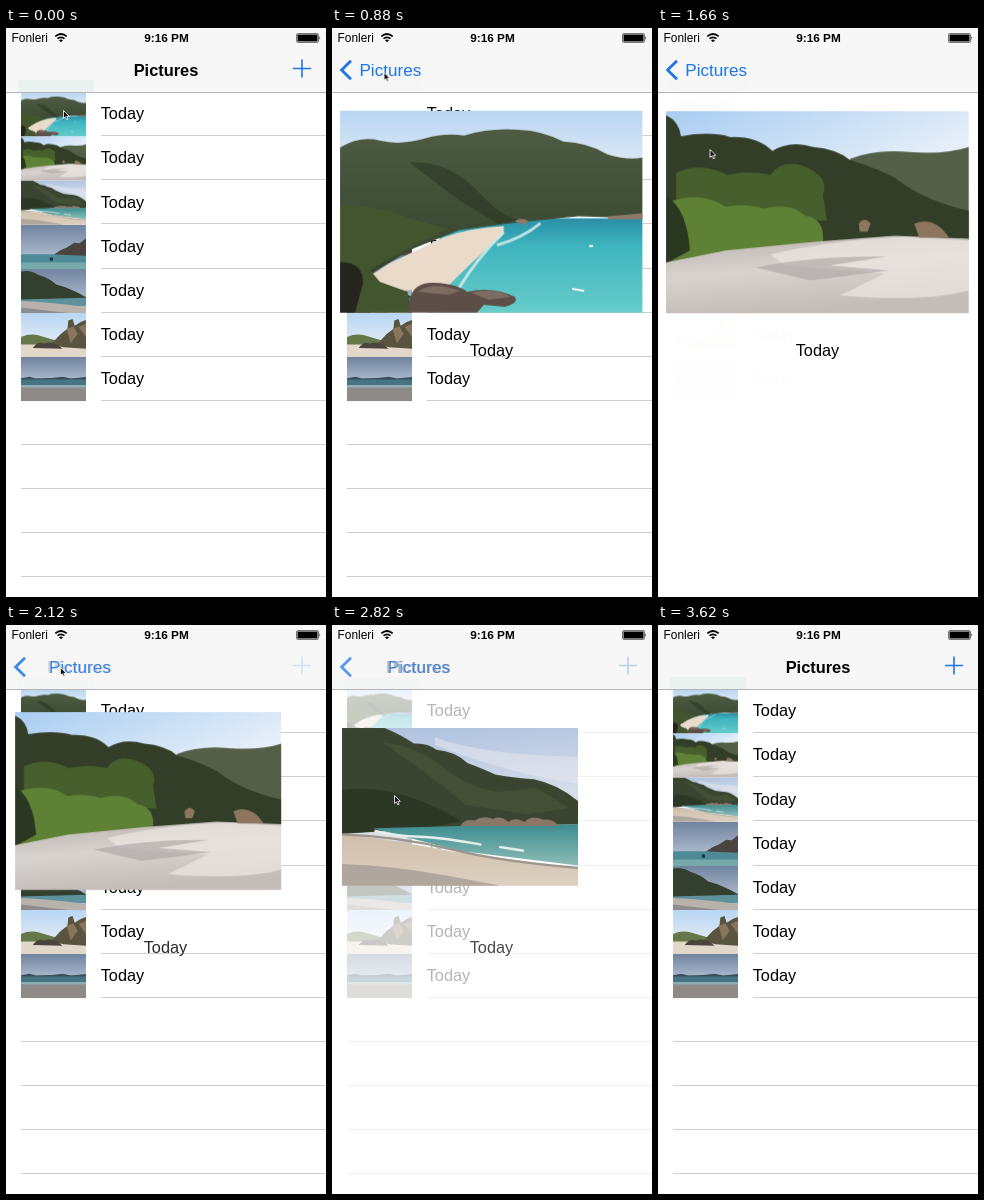
Animation of 320 by 569 pixels, one loop 3900 ms. Source, as an HTML page:

```html
<!DOCTYPE html>
<html lang="en">
<head>
<meta charset="utf-8">
<title>Picture list</title>
<style>
  html, body { margin: 0; width: 100%; height: 100%; overflow: hidden; background: #fff; }
  body { position: relative; font-family: "Liberation Sans", Arial, sans-serif; }
  svg { position: absolute; display: block; }
  .layer { left: 0; top: 0; width: 320px; height: 569px; }
  .list { z-index: 0; }
  .veil { z-index: 2; }
  .label { z-index: 4; }
  .nav { z-index: 5; }
  .cursor { z-index: 6; left: 0; top: 0; width: 9px; height: 13px; overflow: visible; }

  /* Photos rest as row thumbnails and grow to this box. */
  .photo {
    --rest: translate(7px, calc(44.1px * var(--row) - 18.5px)) scale(.2131, .2167);
    left: 7.5px; top: 82.5px; width: 305px; height: 203.5px;
    z-index: 1; transform-origin: 0 0; transform: var(--rest);
  }

  .p1, .p2, .p3, .veil, .label, .title, .back, .chevron, .action, .cursor {
    animation: 3900ms ease-in-out infinite;
  }
  .p1 { animation-name: open1; }
  .p2 { animation-name: open2; }
  .p3 { animation-name: open3; }
  .veil { animation-name: veil; }
  .label, .chevron { animation-name: show; }
  .action { animation-name: hide; }
  .title { animation-name: title; }
  .back { animation-name: back; }
  .cursor { animation-name: cursor; }

  @keyframes open1 {
    0%, .25% { transform: var(--rest); z-index: 1; }
    .26% { transform: var(--rest); z-index: 3; }
    7.44%, 22.05% { transform: none; z-index: 3; }
    29.49% { transform: var(--rest); z-index: 3; }
    29.5%, 100% { transform: var(--rest); z-index: 1; }
  }
  @keyframes open2 {
    0%, 35.89% { transform: var(--rest); z-index: 1; }
    35.9% { transform: var(--rest); z-index: 3; }
    43.08%, 52.31% { transform: none; z-index: 3; }
    59.74% { transform: var(--rest); z-index: 3; }
    59.75%, 100% { transform: var(--rest); z-index: 1; }
  }
  @keyframes open3 {
    0%, 67.81% { transform: var(--rest); z-index: 1; }
    67.82% { transform: var(--rest); z-index: 3; }
    75%, 83.85% { transform: none; z-index: 3; }
    91.79% { transform: var(--rest); z-index: 3; }
    91.8%, 100% { transform: var(--rest); z-index: 1; }
  }
  /* The list fades out on opening and is back at once on closing. */
  @keyframes veil {
    0%, .26%, 22.06%, 35.9%, 52.32%, 67.82%, 83.86%, 100% { opacity: 0; }
    7.44%, 22.05%, 43.08%, 52.31%, 75%, 83.85% { opacity: 1; }
  }
  @keyframes show {
    0%, .26%, 29.49%, 35.9%, 59.74%, 67.82%, 91.79%, 100% { opacity: 0; }
    7.44%, 22.05%, 43.08%, 52.31%, 75%, 83.85% { opacity: 1; }
  }
  @keyframes hide {
    0%, .26%, 29.49%, 35.9%, 59.74%, 67.82%, 91.79%, 100% { opacity: 1; }
    7.44%, 22.05%, 43.08%, 52.31%, 75%, 83.85% { opacity: 0; }
  }
  @keyframes title {
    0%, .26%, 29.49%, 35.9%, 59.74%, 67.82%, 91.79%, 100% { opacity: 1; transform: none; }
    7.44%, 22.05%, 43.08%, 52.31%, 75%, 83.85% { opacity: 0; transform: translateX(-103px); }
  }
  @keyframes back {
    0%, .26%, 29.49%, 35.9%, 59.74%, 67.82%, 91.79%, 100% { opacity: 0; transform: translateX(103px); }
    7.44%, 22.05%, 43.08%, 52.31%, 75%, 83.85% { opacity: 1; transform: none; }
  }
  @keyframes cursor {
    0%, 7.44% { transform: translate(57px, 82px); opacity: 1; }
    12.31%, 15.38% { transform: translate(56px, 70px); }
    22.05%, 30.26% { transform: translate(51.5px, 44px); }
    32.31%, 43.08% { transform: translate(51.5px, 121px); }
    48.21%, 60% { transform: translate(54px, 42px); }
    65.64%, 75% { transform: translate(62px, 170px); }
    80%, 91.79% { transform: translate(56px, 39px); opacity: 1; }
    91.8%, 100% { transform: translate(56px, 39px); opacity: 0; }
  }
</style>
</head>
<body>

<svg class="layer list" viewBox="0 0 320 569">
  <path shape-rendering="crispEdges" stroke="#cfcfd2" d="M95 107.5h225M95 151.5h225M95 195.5h225M95 240.5h225M95 284.5h225M95 328.5h225M95 372.5h225M15 416.5h305M15 460.5h305M15 504.5h305M15 548.5h305"/>
  <g font-size="16.3">
    <text x="94.7" y="91.3">Today</text>
    <text x="94.7" y="135.4">Today</text>
    <text x="94.7" y="179.5">Today</text>
    <text x="94.7" y="223.6">Today</text>
    <text x="94.7" y="267.7">Today</text>
    <text x="94.7" y="311.8">Today</text>
    <text x="94.7" y="355.9">Today</text>
  </g>
</svg>

<!-- Bay seen from above -->
<svg class="photo p1" style="--row:0" viewBox="0 0 305 203" preserveAspectRatio="none">
  <defs>
    <linearGradient id="sky1" x2="0" y2="1"><stop stop-color="#b9d6f3"/><stop offset="1" stop-color="#e2ebf5"/></linearGradient>
    <linearGradient id="sea1" x2="0" y2="1"><stop stop-color="#2a8fa5"/><stop offset=".3" stop-color="#3fb5bf"/><stop offset="1" stop-color="#67ccca"/></linearGradient>
    <linearGradient id="hill1" x2="0" y2="1"><stop stop-color="#4d5c43"/><stop offset="1" stop-color="#303c27"/></linearGradient>
  </defs>
  <path fill="url(#sky1)" d="M0 0h305v60H0z"/>
  <path fill="url(#sea1)" d="M100 108h205v95H100z"/>
  <path fill="url(#hill1)" d="M0 37Q20 25 40 30T85 28Q105 22 125 25Q150 17 180 19Q205 20 225 31Q250 32 270 44Q290 50 305 47V108L240 106 200 110 165 114 120 120 70 140 30 165V203H0z"/>
  <path fill="#263121" d="M70 52Q110 50 140 82T185 108L160 114 120 90z" opacity=".5"/>
  <path fill="#8b7a68" d="M176 111q6-5 14 0l-5 4zM270 106l35-3v6h-35z"/>
  <path fill="#e9dac9" d="M165 116Q130 118 105 127L52 152 27 168 45 182 74 180 108 177Q125 160 140 146T165 123z"/>
  <path fill="none" stroke="#d9f0ec" stroke-width="3" opacity=".8" d="M202 113Q184 128 158 135M165 122Q138 148 120 178"/>
  <path fill="#43552f" d="M0 95Q40 95 70 108L108 119 70 138 30 160 40 172 68 182 72 203H0z"/>
  <path fill="#26261f" d="M0 152q24 0 23 22l-8 29H0z"/>
  <path fill="#5d4e47" d="M70 190Q74 172 95 173Q118 174 128 182Q154 176 176 187Q181 193 166 197L145 195 138 203H68z"/>
  <path fill="#7d6c62" d="M78 182q15-11 43-1l-12 4zM132 183q24-6 40 4l-22 3z"/>
  <path stroke="#f3f6f2" stroke-width="2" d="M234 179l12 2M251 136h4"/>
</svg>

<!-- Beach with bushes -->
<svg class="photo p2" style="--row:1" viewBox="0 0 305 203" preserveAspectRatio="none">
  <defs>
    <linearGradient id="sky2" x2="1" y2=".6"><stop stop-color="#a9cdf2"/><stop offset="1" stop-color="#eef3f9"/></linearGradient>
    <linearGradient id="sand2" x2=".3" y2="1"><stop stop-color="#b9b2ae"/><stop offset=".5" stop-color="#d9d3cf"/><stop offset="1" stop-color="#c3bcb9"/></linearGradient>
  </defs>
  <path fill="url(#sky2)" d="M0 0h305v80H0z"/>
  <path fill="#536047" d="M185 48Q210 38 245 41T305 36V128H185z"/>
  <path fill="#323e27" d="M0 4Q13 10 15 25Q45 20 65 26Q92 25 107 40Q125 29 148 36Q172 38 185 49Q215 58 232 68Q260 90 305 100V129L190 130 0 150z"/>
  <path fill="#475f2d" d="M10 62Q35 50 62 64Q85 59 105 64Q116 48 138 55Q165 65 158 84L162 110H10z"/>
  <path fill="#5f8136" d="M0 92Q35 79 60 96Q80 92 98 98Q125 91 140 105Q160 108 158 131L0 153z"/>
  <path fill="#2b3821" d="M0 85Q21 98 24 140L0 153z"/>
  <path fill="url(#sand2)" d="M0 152L60 140 150 131 230 125 305 128V203H0z"/>
  <path fill="#ebe6e1" d="M105 144Q160 130 240 126L305 130V180Q260 192 175 185L220 163 120 155z" opacity=".75"/>
  <path fill="#a9a3a2" d="M90 157Q150 145 222 146L165 155 225 160 145 170z" opacity=".6"/>
  <path fill="#8e755f" d="M194 113q6-8 12 0l-3 8h-8zM250 113q20-8 35 14h-30z"/>
</svg>

<!-- Shore below a wooded slope -->
<svg class="photo p3" style="--row:2" viewBox="0 0 305 203" preserveAspectRatio="none">
  <defs>
    <linearGradient id="sky3" x2=".3" y2="1"><stop stop-color="#adc0de"/><stop offset="1" stop-color="#dce2ec"/></linearGradient>
    <linearGradient id="sea3" x2="0" y2="1"><stop stop-color="#3d8d91"/><stop offset="1" stop-color="#8dbdb6"/></linearGradient>
    <linearGradient id="sand3" x2="0" y2="1"><stop stop-color="#d0bfad"/><stop offset="1" stop-color="#ddd0c0"/></linearGradient>
  </defs>
  <path fill="url(#sky3)" d="M0 0h305v125H0z"/>
  <path fill="#e5e7ee" d="M120 12Q180 35 305 37V72Q220 60 120 22z" opacity=".55"/>
  <path fill="#394530" d="M0 0H55Q75 8 93 20Q110 19 122 28Q146 30 162 45Q184 53 198 60Q225 65 248 66Q278 72 305 94V124L150 127 0 136z"/>
  <path fill="#4c593c" d="M52 18Q100 25 130 50T200 82L250 77 295 103 240 111 160 99 120 67z" opacity=".55"/>
  <path fill="#293323" d="M0 80Q70 70 155 120L110 128 0 136z" opacity=".7"/>
  <path fill="url(#sea3)" d="M40 129L150 126 305 124V177L150 158z"/>
  <path fill="#8b776a" d="M153 126q5-10 18-7q12-7 24-2q10-5 20 4q8-8 21 0q8-10 24-3q12-2 20 8z"/>
  <path fill="url(#sand3)" d="M0 137Q55 142 110 153T210 168L305 181V203H0z"/>
  <path fill="#a39a94" d="M0 175Q65 177 135 190L205 203H0z" opacity=".75"/>
  <path fill="none" stroke="#e9f1ee" stroke-width="3" d="M42 132Q70 139 100 140T180 150M203 153l32 5"/>
  <path fill="none" stroke="#9b948a" stroke-width="3" d="M0 137Q75 140 140 156T305 180"/>
</svg>

<svg class="photo" style="--row:3" viewBox="0 0 305 203" preserveAspectRatio="none">
  <path fill="url(#dusk)" d="M0 0h305v140H0z"/>
  <path fill="#4f8b97" d="M0 136h305v67H0z"/>
  <path fill="#76a9aa" d="M0 174h305v29H0z"/>
  <path fill="#4a4440" d="M155 137L185 117 215 104 250 83 275 85 305 62V143z"/>
  <path fill="#26313a" d="M135 151h15v15h-15z"/>
</svg>

<svg class="photo" style="--row:4" viewBox="0 0 305 203" preserveAspectRatio="none">
  <path fill="url(#dusk)" d="M0 0h305v135H0z"/>
  <path fill="#33402f" d="M0 12Q45 4 80 27Q130 40 165 72Q230 88 305 130V139L0 145z"/>
  <path fill="#5d929c" d="M0 141l305-8v40H0z"/>
  <path fill="#b9b1ab" d="M0 148Q130 154 305 175V203H0z"/>
  <path fill="#8e8d8d" d="M0 178l220 25H0z"/>
</svg>

<svg class="photo" style="--row:5" viewBox="0 0 305 203" preserveAspectRatio="none">
  <path fill="url(#sky1)" d="M0 0h305v150H0z"/>
  <path fill="#657849" d="M0 110Q45 92 85 104T165 127V160H0z"/>
  <path fill="#e2d8ca" d="M0 145h305v58H0z"/>
  <path fill="#59543f" d="M140 145L185 98 218 73 222 34 242 28 252 59 280 42 305 32V165L200 158z"/>
  <path fill="#89745c" d="M214 72l32-10 20 35-33 43zM270 65l35-15v60z"/>
  <path fill="#4b443d" d="M55 161q25-33 52-20q44-18 88 23z"/>
</svg>

<svg class="photo" style="--row:6" viewBox="0 0 305 203" preserveAspectRatio="none">
  <defs>
    <linearGradient id="dusk" x2="0" y2="1"><stop stop-color="#71839f"/><stop offset="1" stop-color="#a9b7cb"/></linearGradient>
  </defs>
  <path fill="url(#dusk)" d="M0 0h305v103H0z"/>
  <path fill="#467485" d="M0 100h305v40H0z"/>
  <path fill="#8fb0b3" d="M0 128h305v14H0z"/>
  <path fill="#8d8a87" d="M0 140h305v63H0z"/>
  <path fill="#3d4c57" d="M0 97l40-7 30 9 75-3 50-5 40 7 70-6v11H0z"/>
</svg>

<svg class="layer veil" viewBox="0 0 320 569"><path fill="#fff" d="M0 0h320v569H0z"/></svg>
<svg class="layer label" viewBox="0 0 320 569"><text x="137.7" y="327.5" font-size="16.3">Today</text></svg>

<svg class="layer nav" viewBox="0 0 320 569">
  <path fill="#f7f7f7" d="M0 0h320v64H0z"/>
  <path class="action" fill="#e9f2ee" d="M12 52h76v12H12z" opacity=".8"/>
  <path fill="#b4b4b6" d="M0 64h320v1H0z"/>
  <text x="5.5" y="14" font-size="11.9">Fonleri</text>
  <text x="160.5" y="14" font-size="11.8" font-weight="700" text-anchor="middle">9:16 PM</text>
  <g fill="none" stroke="#000" stroke-width="1.7">
    <path d="M49.3 8.4q5.7-4.8 11.4 0M51.5 10.7q3.5-2.8 7 0"/>
  </g>
  <path d="M53 12.2q2-1.4 4 0l-2 2z"/>
  <rect x="290.5" y="5.5" width="22" height="9" rx="1.5" fill="none" stroke="#555" stroke-width=".8"/>
  <path d="M291.5 6.5h20v7h-20zM313.5 8.3q1.5 1.7 0 3.4z"/>
  <text class="title" x="160" y="48" font-size="16.4" font-weight="700" text-anchor="middle">Pictures</text>
  <g fill="none" stroke="#1b74ec">
    <path class="action" stroke-width="1.6" d="M287 40.5h18M296 31.5v18"/>
    <path class="chevron" stroke-width="2.8" d="M19 32.8L9.6 42l9.4 9.2"/>
  </g>
  <text class="back" x="26.4" y="48" font-size="17.1" fill="#1b74ec">Pictures</text>
</svg>

<svg class="cursor" viewBox="0 0 9 13">
  <path fill="#111" stroke="#fff" stroke-width=".8" d="M.5.5v8l1.9-1.7 1.4 3 1.3-.6-1.3-2.9h2.5z"/>
</svg>

</body>
</html>
```
